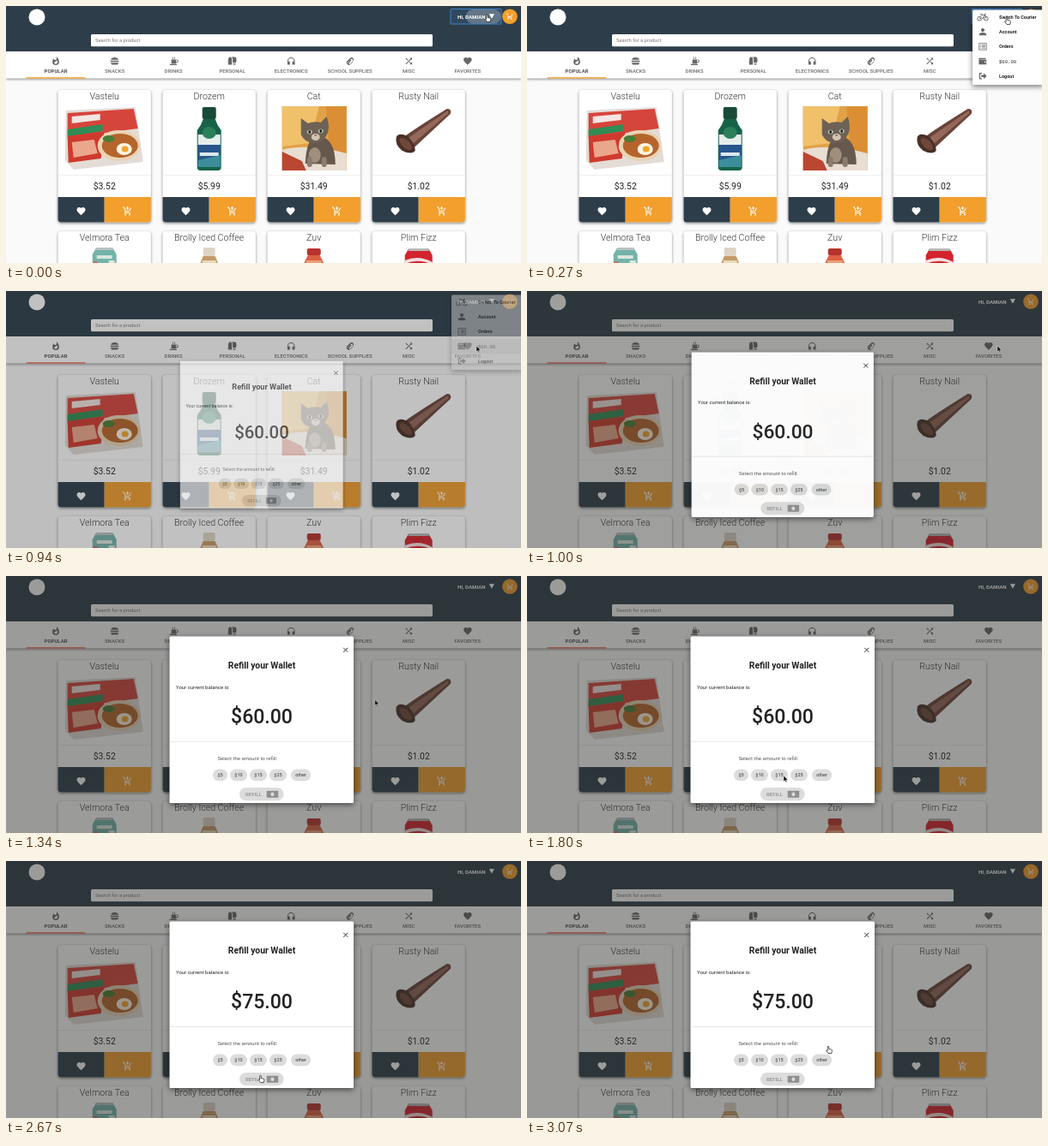
An HTML page for the animation above (3.13 s loop, 600 by 300 pixels).

```html
<!DOCTYPE html>
<html lang="en">
<head>
<meta charset="utf-8">
<title>Shop wallet refill</title>
<style>
html, body { margin: 0; width: 100%; height: 100%; overflow: hidden; }
svg { display: block; width: 600px; height: 300px; font-family: Roboto, "Open Sans", sans-serif; }
.card { filter: drop-shadow(0 1px 1.5px #0007); }
.lift { filter: drop-shadow(0 2px 3px #0008); }
</style>
</head>
<body>
<svg id="stage" viewBox="0 0 600 300"></svg>
<script>
const LOOP = 3130, DARK = '#2d3e4a', ORANGE = '#f29f2d';

const rect = (x, y, w, h, fill, r = 0, more = '') =>
  `<rect x="${x}" y="${y}" width="${w}" height="${h}" rx="${r}" fill="${fill}" ${more}/>`;
const path = (d, fill, more = '') => `<path d="${d}" fill="${fill}" ${more}/>`;
const line = (d, stroke, w) => path(d, 'none', `stroke="${stroke}" stroke-width="${w}"`);
const oval = (x, y, rx, ry, fill, more = '') =>
  `<ellipse cx="${x}" cy="${y}" rx="${rx}" ry="${ry}" fill="${fill}" ${more}/>`;
const text = (s, x, y, size, fill, weight = 400, anchor = 'middle', more = '') =>
  `<text x="${x}" y="${y}" font-size="${size}" fill="${fill}" font-weight="${weight}" text-anchor="${anchor}" ${more}>${s}</text>`;

// Icons are drawn on a 24 unit grid
const icons = {
  flame: 'M13.5.7s.7 2.6.7 4.8c0 2-1.3 3.7-3.4 3.7S7.2 7.5 7.2 5.5C5.2 7.5 4 10.6 4 14a8 8 0 0 0 16 0C20 8.6 17.4 3.8 13.5.7zM11.7 19a3.2 3.2 0 0 1-3.2-3.1c0-1.7 1-2.8 2.8-3.2s3.6-1.2 4.6-2.6c.4 1.3.6 2.7.6 4a4.8 4.8 0 0 1-4.8 4.9z',
  burger: 'M3 9C3 1 21 1 21 9zM2 11h20v3H2zM3 16h18c0 5-3 5-4 5H7c-1 0-4 0-4-5z',
  cup: 'M7 8h13a4 4 0 0 1 0 8h-2v2H7zM18 10v4h2a2 2 0 0 0 0-4zM2 19h19l-2 3H4zM10 2h1.5v5H10zM14 2h1.5v5H14z',
  roll: 'M10 2h8c5 0 5 10 3 14h-8V9c0-4-1-6-3-7zM7 2C1 2 2 12 2 21h9V9c0-4-1-7-4-7zM14 18h6v3h-6z',
  phones: 'M12 3a9 9 0 0 0-9 9v7c0 1 1 2 2 2h4v-8H5v-1a7 7 0 0 1 14 0v1h-4v8h4a2 2 0 0 0 2-2v-7a9 9 0 0 0-9-9z',
  clip: 'M20 5a5.5 5.5 0 0 0-8 0L4 13a6 6 0 0 0 8 8l8-8-2-2-8 8a3 3 0 0 1-4-4l8-8a2.5 2.5 0 0 1 4 4l-7 7-1.5-1.5 6-6-2-2-6 6a3 3 0 0 0 5 4l7.5-7.5a5.5 5.5 0 0 0 0-6z',
  shuffle: 'M10.6 9.2L5.4 4 4 5.4l5.2 5.2zM14.5 4l2 2L4 18.6 5.4 20 18 7.5l2 2V4zM14.8 13.4l-1.4 1.4 3.1 3.1-2 2.1H20v-5.5l-2 2z',
  heart: 'M12 21.3C5.4 15.4 2 12.3 2 8.5 2 5.4 4.4 3 7.5 3 9.2 3 10.9 3.8 12 5.1 13.1 3.8 14.8 3 16.5 3 19.6 3 22 5.4 22 8.5c0 3.8-3.4 6.9-10 12.8z',
  cart: 'M1 2h3.3l4.2 9h7l3.9-7 1.7 1-3.9 7c-.3.6-1 1-1.7 1H8l-1 2h12v2H7c-2 0-2.5-2-1.7-3l1.3-2.4L3 4H1zM5 20a2 2 0 1 0 4 0 2 2 0 1 0-4 0zM15 20a2 2 0 1 0 4 0 2 2 0 1 0-4 0z',
  plus: 'M11 9V6H8V4h3V1h2v3h3v2h-3v3z',
  person: 'M7 7a5 5 0 1 0 10 0A5 5 0 1 0 7 7zM2 22v-3c0-7 20-7 20 0v3z',
  list: 'M1 2h22v20H1zM3 4v16h18V4zM5 7h2v2H5zM9 7h10v2H9zM5 11h2v2H5zM9 11h10v2H9zM5 15h2v2H5zM9 15h10v2H9z',
  wallet: 'M3 3h17v3H4v1h18v14H3c-1 0-2-1-2-2V5c0-1 1-2 2-2zM17 12v4h3v-4z',
  exit: 'M2 3h8v3H5v12h5v3H2zM8 9h7V4l8 8-8 8v-5H8z',
  bike: 'M0 15a5 5 0 1 0 10 0A5 5 0 1 0 0 15zM1.5 15a3.5 3.5 0 1 1 7 0 3.5 3.5 0 1 1-7 0zM14 15a5 5 0 1 0 10 0 5 5 0 1 0-10 0zM15.5 15a3.5 3.5 0 1 1 7 0 3.5 3.5 0 1 1-7 0zM5 14l4-7h7V4h3v1.5h-1.5L20 15h-1.5L16 9l-4 6.5H5zM9.5 8.5l-3 5.5h5l3.5-5.5zM6 5h5v1.5H6z'
};
const icon = (name, x, y, size, fill) =>
  path(icons[name], fill, `fill-rule="evenodd" transform="translate(${x - size / 2} ${y - size / 2}) scale(${size / 24})"`);

// Product pictures, relative to the centre of the card and its top
const noodles = path('M-45 24L36 20 45 84-36 93-46 82z', '#e4dcd6') + path('M-43 27L34 22 39 45-43 56z', '#d6453c') +
  path('M-38 31L-5 28-5 35-38 39z', '#f3e6e2') + path('M-43 46L-2 40-2 48-43 54z', '#2f8d55') +
  path('M-43 54L0 49-4 80-42 85z', '#cf3a2e') + path('M-38 61L-12 58-8 74-36 79z', '#eba78c') +
  oval(17, 65, 25, 18, '#e9d3b4') + oval(18, 65, 21, 14, '#b5652c') +
  oval(23, 69, 9, 7, '#fff4e5') + oval(24, 69, 4, 3.5, '#f4a52a') + oval(5, 57, 7, 4, '#497d35');
const medicine = rect(-8, 20, 16, 14, '#174b37', 2) +
  path('M-7 34H7Q9 41 14 47V90Q14 94 10 94H-10Q-14 94-14 90V47Q-9 41-7 34z', '#176348') +
  rect(-13, 52, 26, 38, '#28558c') + rect(-13, 52, 26, 12, '#e6eeeb') + oval(0, 50, 8, 7, '#2b805a') +
  rect(-11, 73, 22, 4, '#dbe8ef') + path('M-13 82L13 76V90H-13z', '#3d8e9c');
const kitten = rect(-37, 19, 75, 75, '#e0a147') + path('M-37 19H6L-4 62-37 66z', '#f0c06a') +
  path('M14 19H38V77L18 72z', '#dc8e35') + path('M-37 70Q-8 62 38 74V94H-37z', '#e8ded1') +
  path('M-37 72L-14 83-9 94H-37z', '#b94731') + path('M-10 86Q-9 55 5 53 25 56 25 87z', '#66584c') +
  path('M-15 33L-7 39Q0 36 8 38L15 31Q20 46 14 54 8 63-1 62-11 61-15 52z', '#6e6155') +
  oval(-5, 49, 3, 2.5, '#b9c4b4') + oval(8, 48, 3, 2.5, '#b9c4b4') + oval(-5, 49, 1.4, 2, '#222') +
  oval(8, 48, 1.4, 2, '#222') + oval(2, 55, 5, 4, '#d5c4b3') + oval(2, 53, 1.5, 1, '#996c62') +
  oval(1, 76, 7, 9, '#a18f7d') + rect(-8, 78, 6, 12, '#8b7c6d', 3) + rect(9, 78, 6, 12, '#8b7c6d', 3);
const nail = path('M-16 54Q-4 45 33 22 39 22 37 28L-6 68z', '#6a4338') + path('M-12 56L34 24 35 27-8 64z', '#94685a') +
  path('M-26 55Q-23 49-13 54-4 62-4 71-8 76-19 71-28 64-26 55z', '#493028') +
  oval(-15, 63, 4.5, 9, '#71473a', 'transform="rotate(-46 -15 63)"');
const tea = path('M-10 20H10L14 27V50H-14V27z', '#73b3aa') + rect(-10, 19, 20, 3, '#b9c2c2') +
  rect(-9, 28, 18, 4, '#d9e6dc') + rect(-13, 35, 5, 8, '#c76f72') + rect(5, 34, 7, 9, '#d9e6dc');
const coffee = rect(-7, 19, 14, 10, '#ded4c5', 2) + path('M-7 29H7L10 36V50H-10V36z', '#c59a67') + rect(-8, 34, 16, 4, '#ead9bd');
const juice = rect(-8, 20, 16, 8, '#b8322e', 2) + path('M-7 28H7L11 36V50H-11V36z', '#dd6042') + rect(-9, 34, 18, 5, '#eca077');
const cola = path('M-12 21H12L16 28V50H-16V28z', '#d3232d') + rect(-12, 20, 24, 3, '#b7b7b7') + path('M-16 34Q0 27 16 36V39Q0 31-16 38z', '#f3dfdf');

function card(title, price, picture, col, row) {
  const x = 60.5 + 122 * col, y = 98 + 165 * row, mid = 54.2;
  return `<g class="card" transform="translate(${x} ${y})">` + rect(0, 0, 108.4, 154.5, '#fff', 4) +
    text(title, mid, 11.3, 10.6, '#333', 300) + `<g transform="translate(${mid})">${picture}</g>` +
    rect(0, 99, 108.4, .6, '#e4e4e4') + text(price, mid, 116.3, 10.4, '#222') +
    path('M0 125H54.2V154.5H4Q0 154.5 0 150.5z', DARK) +
    path('M54.2 125H108.4V150.5Q108.4 154.5 104.4 154.5H54.2z', ORANGE) +
    icon('heart', 27, 141.5, 12, '#fff') + icon('cart', 81, 141.5, 12, '#fff') + icon('plus', 81, 141.5, 12, '#fff') + '</g>';
}
const products = [
  ['Vastelu', '$3.52', noodles], ['Drozem', '$5.99', medicine], ['Cat', '$31.49', kitten], ['Rusty Nail', '$1.02', nail],
  ['Velmora Tea', '', tea], ['Brolly Iced Coffee', '', coffee], ['Zuv', '', juice], ['Plim Fizz', '', cola]
];
const tabs = [
  ['flame', 'POPULAR'], ['burger', 'SNACKS'], ['cup', 'DRINKS'], ['roll', 'PERSONAL'],
  ['phones', 'ELECTRONICS'], ['clip', 'SCHOOL SUPPLIES'], ['shuffle', 'MISC'], ['heart', 'FAVORITES']
];
const menuRows = [['bike', 'Switch To Courier'], ['person', 'Account'], ['list', 'Orders'], ['wallet', '$60.00'], ['exit', 'Logout']];
const chips = [['$5', 241, 17], ['$10', 261, 20], ['$15', 284, 20], ['$25', 307, 20], ['other', 332, 23]];

const page = rect(0, 0, 600, 300, '#fafafa') +
  products.map(([name, price, pic], i) => card(name, price, pic, i % 4, i >> 2)).join('') +
  `<g class="card">${rect(0, 53, 600, 31.5, '#fff')}</g>` +
  tabs.map(([name, label], i) => {
    const x = 58 + 68.55 * i;
    return icon(name, x, 64.3, 11.5, '#666') + text(label, x, 77.6, 6, i ? '#6b6b6b' : '#333', 500);
  }).join('') + rect(23.5, 83.2, 69, 1.4, ORANGE, 0, 'id="underline"') +
  rect(0, 0, 600, 53, DARK) + oval(36, 13, 9.5, 9.5, '#fff') +
  rect(99, 33, 398, 14.3, '#fff', 1.5) + text('Search for a product', 104, 42.3, 5.8, '#777', 400, 'start') +
  `<g id="focus">${rect(518, 3.5, 59, 17.5, '#30485d', 1, 'stroke="#3b85cf"')}
   <g id="ripple">${rect(536, 4, 40.5, 16.5, '#fff', 8, 'fill-opacity=".25"')}</g></g>` +
  text('HI, DAMIAN', 526, 14.7, 6.1, '#fff', 700, 'start') + path('M562.8 9.3H569L565.9 14.8z', '#fff') +
  oval(587, 12.3, 8.8, 8.8, ORANGE) + icon('cart', 587, 12.3, 9, '#fff');

const menu = `<g id="menu" class="lift">${rect(519, 4.5, 83, 87.5, '#fff', 1.5)}${rect(519, 0, 81, 17, '#eee', 0, 'id="hover"')}` +
  menuRows.map(([name, label], i) => {
    const y = 13 + 17.2 * i;
    return icon(name, 531, y, name == 'bike' ? 13 : 10, '#666') + (i == 3
      ? text(label, 550, y + 2, 5.6, '#333', 400, 'start', 'font-family="Liberation Mono, monospace"')
      : text(label, 550, y + 2, 5.5, '#222', 700, 'start'));
  }).join('') + '</g>';

const dialog = rect(0, 0, 600, 300, 'rgba(44,44,42,.47)', 0, 'id="shade"') +
  `<g id="dialog" class="lift">${rect(190.5, 70.5, 214.5, 194.5, '#fff', 1.5)}` +
  line('M393.2 83.8L398.2 88.8M398.2 83.8L393.2 88.8', '#333', 1) +
  text('Refill your Wallet', 298, 108.3, 10.3, '#222', 700) +
  text('Your current balance is:', 198, 132, 6, '#222', 400, 'start') +
  text('', 298, 172.3, 23, '#222', 500, 'middle', 'id="balance"') + rect(190.5, 193, 214.5, .7, '#ddd') +
  text('Select the amount to refill:', 246.5, 215.3, 6, '#555', 400, 'start') +
  chips.map(([label, x, w], i) => rect(x, 225.5, w, 13.7, '#dcdcdc', 6.85, `id="chip${i}"`) +
    text(label, x + w / 2, 234.3, 5.5, '#333')).join('') +
  `<g id="pill">${rect(272, 247, 51.5, 15.3, 'inherit', 7.65)}${text('REFILL', 279, 256.8, 6.1, 'currentColor', 500, 'start')}` +
  rect(303.7, 250.7, 13.5, 8, 'currentColor', .6) + oval(310.4, 254.7, 2, 2.2, 'inherit') + '</g></g>';

const cursor = `<g id="cursor">${path('M0 0V7L1.6 5.6 2.7 8 3.8 7.5 2.7 5.2H5z', '#111', 'id="arrow" stroke="#fff" stroke-width=".4"')}
  ${path('M-.8.5a.8.8 0 0 1 1.6 0V3l2.8.6q.9.3.8 1.3L3.8 8H0L-2.5 4.8q.4-1 1.7 0z', '#fff', 'id="hand" stroke="#111" stroke-width=".7"')}</g>`;

const $ = id => document.getElementById(id);
$('stage').innerHTML = page + menu + dialog + cursor;

const part = (t, from, span) => Math.min(1, Math.max(0, (t - from) / span));
const easeOut = p => 1 - (1 - p) ** 3;
const easeBoth = p => p * p * (3 - 2 * p);
const set = (id, name, value) => $(id).setAttribute(name, value);
const zoom = (id, x, y, s) => set(id, 'transform', `translate(${x} ${y}) scale(${s}) translate(${-x} ${-y})`);

const OPEN = 900, PICK = 1890, PAID = 2600;
// Time, x and y of the pointer tip
const trail = [[0, 560.5, 10.5], [270, 559, 13.5], [400, 559, 14], [800, 548, 64], [1080, 548, 64],
  [1620, 299, 233], [1980, 299, 233], [2220, 295, 251.5], [2640, 295, 251.5], [2960, 351, 216.5], [LOOP, 351, 216.5]];

function pointer(t) {
  const i = trail.findIndex(k => k[0] > t);
  const [t0, x0, y0] = trail[i - 1], [t1, x1, y1] = trail[i];
  const p = easeBoth((t - t0) / (t1 - t0));
  return [x0 + (x1 - x0) * p, y0 + (y1 - y0) * p];
}

function draw(t) {
  const [x, y] = pointer(t), opened = t >= OPEN;
  const hand = t < 560 || t >= PICK, ready = t >= PICK && t < PAID;
  set('cursor', 'transform', `translate(${x} ${y})`);
  set('hand', 'opacity', +hand);
  set('arrow', 'opacity', +!hand);

  set('focus', 'opacity', +!opened);
  set('ripple', 'opacity', 1 - part(t, 70, 200));
  const grow = easeOut(part(t, 60, 120));
  set('menu', 'opacity', Math.min(grow, 1 - part(t, OPEN, 90)));
  zoom('menu', 600, 4.5, .8 + .2 * grow);
  set('hover', 'y', 4.5 + 17.2 * Math.floor((y - 2.5) / 17.2));
  set('hover', 'opacity', +(t > 300));

  const show = easeOut(part(t, OPEN, 150));
  set('shade', 'opacity', show);
  set('dialog', 'opacity', show);
  zoom('dialog', 297.75, 167.75, .7 + .3 * show);
  set('underline', 'fill', opened ? '#ee6a4c' : ORANGE);
  $('balance').textContent = t < PAID ? '$60.00' : '$75.00';

  set('chip2', 'fill', ready ? '#b0b0b0' : '#dcdcdc');
  set('pill', 'fill', ready ? '#43a047' : '#dcdcdc');
  set('pill', 'color', ready ? '#fff' : '#8f8f8f');
}

const start = performance.now();
(function tick() {
  draw((performance.now() - start) % LOOP);
  requestAnimationFrame(tick);
})();
</script>
</body>
</html>
```
